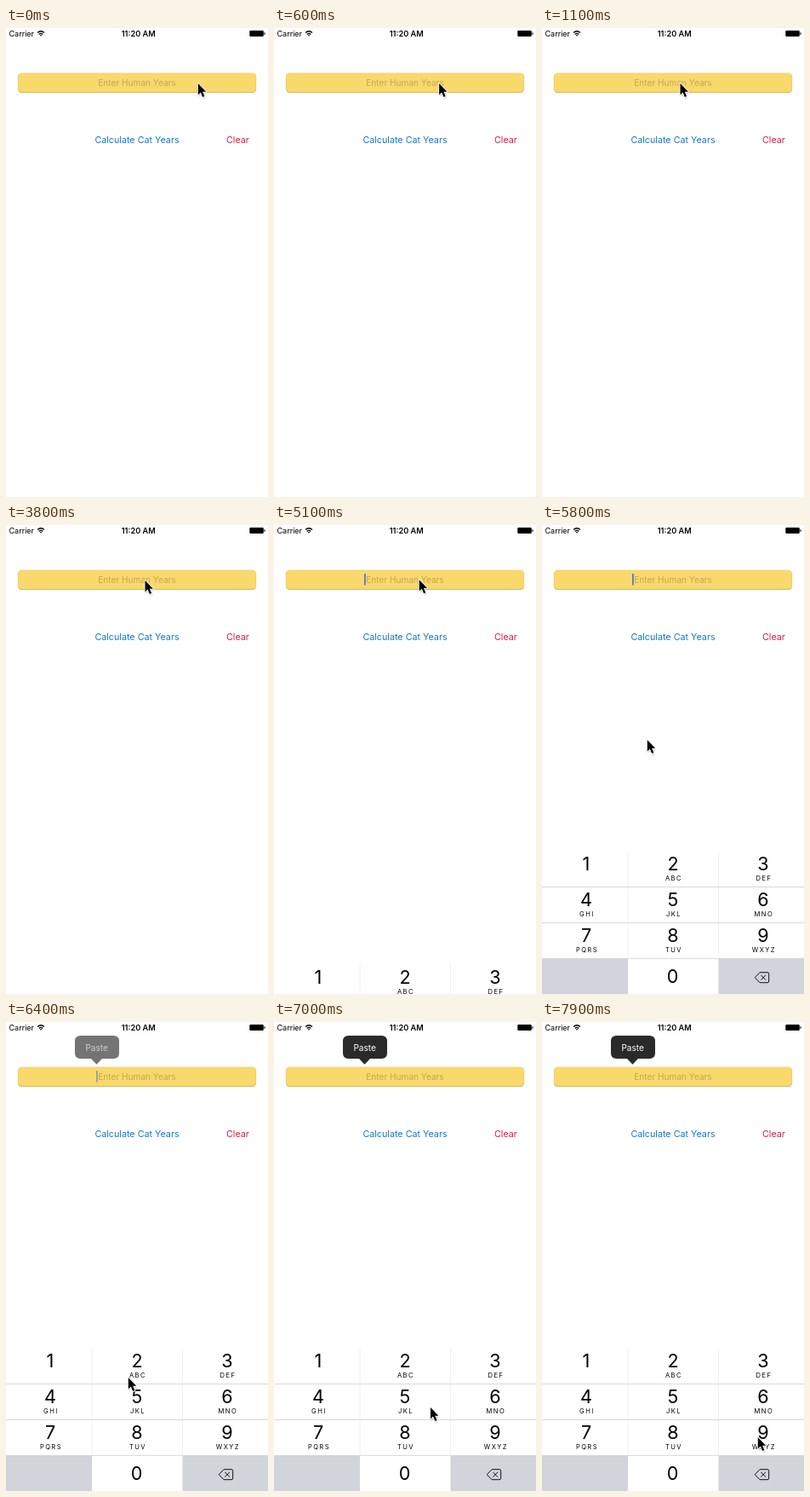
An HTML page that plays this animation: 308 px wide and 550 px high, repeating every 8 s.

```html
<!DOCTYPE html>
<html lang="en">
<head>
<meta charset="utf-8">
<title>Cat Years</title>
<style>
  html, body { margin: 0; width: 100%; height: 100%; overflow: hidden; background: #fff; }
  svg { display: block; width: 308px; height: 550px; font-family: Inter, Roboto, sans-serif; }
  .mid { text-anchor: middle; }
  .btn { font-size: 10.8px; letter-spacing: -.03px; }
  .digit { font-size: 21.6px; text-anchor: middle; }
  .letters { font-size: 7.6px; letter-spacing: 1.4px; text-anchor: middle; }
</style>
</head>
<body>
<svg viewBox="0 0 308 550">
  <defs>
    <filter id="soft" x="-50%" y="-50%" width="200%" height="200%"><feGaussianBlur stdDeviation="1.1"/></filter>
    <path id="arrow" d="M0 0V13.4L3 10.6L5.4 16.1L7.6 15.1L5.3 9.8H9.4Z"/>
  </defs>

  <!-- status bar -->
  <text x="3.5" y="9.8" font-size="9.1" letter-spacing="-.05">Carrier</text>
  <g fill="none" stroke="#000" stroke-width="1.3">
    <path d="M37 5.5Q41 1.9 45 5.5M38.7 7.4Q41 5.3 43.3 7.4"/>
    <path d="M41 9.8L39.7 8.4Q41 7.4 42.3 8.4Z" fill="#000" stroke="none"/>
  </g>
  <text class="mid" x="155.7" y="9.8" font-size="9.2" font-weight="600">11:20 AM</text>
  <rect x="286.3" y="3" width="16.5" height="7" rx="1.3"/>
  <rect x="303.4" y="5.2" width="1.2" height="2.6" rx=".6"/>

  <!-- form -->
  <rect x="14" y="53.4" width="280" height="22.6" rx="4.2" fill="#cfb36a"/>
  <rect x="14.2" y="52.9" width="279.6" height="22.2" rx="4.2" fill="#fad96c" stroke="#e8c866" stroke-width=".5"/>
  <text class="mid" x="154" y="67.8" font-size="10.2" letter-spacing="-.05" fill="#c4a655">Enter Human Years</text>
  <rect id="caret" x="106.1" y="57" width="1.6" height="13.6" fill="#4a6bd8"/>
  <text class="btn mid" x="154" y="134.6" fill="#1478c6">Calculate Cat Years</text>
  <text class="btn mid" x="272.4" y="134.6" fill="#d2204b">Clear</text>

  <g id="pad">
    <rect y="382" width="308" height="168" fill="#fff"/>
    <path d="M0 508H101V550H0ZM207.5 508H308V550H207.5Z" fill="#d1d4db"/>
    <path d="M101 383V508M207.5 383V508" stroke="#ebedef" stroke-width=".8"/>
    <path d="M0 424.5H308M0 466.5H308M101 508.4H207.5" stroke="#d3d5d9" stroke-width=".9"/>
    <path d="M250.3 530.7L255.4 525.3Q256 524.7 257 524.7H265Q266.7 524.7 266.7 526.3V535Q266.7 536.7 265 536.7H257Q256 536.7 255.4 536.1ZM257.4 527.9L262.9 533.5M262.9 527.9L257.4 533.5"
      fill="none" stroke="#111" stroke-width="1" stroke-linejoin="round"/>
  </g>

  <g id="menu">
    <path d="M87.5 16H126.5Q133 16 133 22.5V36.5Q133 43 126.5 43H113L106.5 49.8L100 43H87.5Q81 43 81 36.5V22.5Q81 16 87.5 16Z" fill="#2a2a2a"/>
    <text id="paste" class="mid" x="106.7" y="33.6" font-size="10.1" fill="#fff">Paste</text>
  </g>

  <g id="cursor">
    <use href="#arrow" x=".6" y="1.6" filter="url(#soft)" opacity=".4"/>
    <use href="#arrow" stroke="#fff" stroke-width="1.8" stroke-linejoin="round"/>
    <use href="#arrow"/>
  </g>
</svg>
<script>
const LOOP = 8000, STEP = 100;
const $ = id => document.getElementById(id);
const [caret, pad, menu, paste, cursor] = ['caret', 'pad', 'menu', 'paste', 'cursor'].map($);

function addText(cls, x, y, str) {
  const el = document.createElementNS('http://www.w3.org/2000/svg', 'text');
  el.setAttribute('class', cls);
  el.setAttribute('x', x);
  el.setAttribute('y', y);
  el.textContent = str;
  pad.append(el);
}

const columns = [52, 154, 260];
['', 'ABC', 'DEF', 'GHI', 'JKL', 'MNO', 'PQRS', 'TUV', 'WXYZ'].forEach((letters, i) => {
  const x = columns[i % 3], y = 405.3 + 42 * Math.floor(i / 3);
  addText('digit', x, y, i + 1);
  addText('letters', x + .9, y + 11.2, letters);
});
addText('digit', 153.5, 537.3, 0);

// Keys are [time, ...values], interpolated linearly
function tween(keys, t) {
  const n = keys.findIndex(k => k[0] > t);
  if (n === 0) return keys[0].slice(1);
  if (n < 0) return keys[keys.length - 1].slice(1);
  const a = keys[n - 1], b = keys[n], p = (t - a[0]) / (b[0] - a[0]);
  return a.slice(1).map((v, i) => v + (b[i + 1] - v) * p);
}

const pointer = [
  [400, 225.8, 65], [800, 162.5, 65], [3700, 162.5, 65], [3800, 163.5, 65],
  [4000, 170.7, 64.2], [5100, 170.7, 64.2], [5800, 123.8, 252], [6400, 143.8, 417],
  [6800, 144, 419], [7000, 184, 452], [7300, 72, 411], [7500, 72, 411], [7900, 253.8, 487]
];
const padShift = [[5100, 133], [5200, 40], [5300, 8], [5400, 0]];
const menuFade = [[6250, 0], [6400, .65], [6500, 1]];
const caretFade = [[6300, 1], [6400, .6], [6900, 0]];

function draw(now) {
  const t = Math.floor(now % LOOP / STEP) * STEP;
  const focused = t >= 4900;
  const [x, y] = tween(pointer, t);
  cursor.setAttribute('transform', `translate(${x} ${y})`);
  pad.setAttribute('transform', `translate(0 ${focused ? tween(padShift, t)[0] : 170})`);
  caret.setAttribute('opacity', focused ? tween(caretFade, t)[0] : 0);
  const shown = tween(menuFade, t)[0];
  menu.setAttribute('opacity', shown);
  paste.setAttribute('opacity', shown);
}

const start = performance.now();
function tick() {
  draw(performance.now() - start);
  requestAnimationFrame(tick);
}
tick();
</script>
</body>
</html>
```
